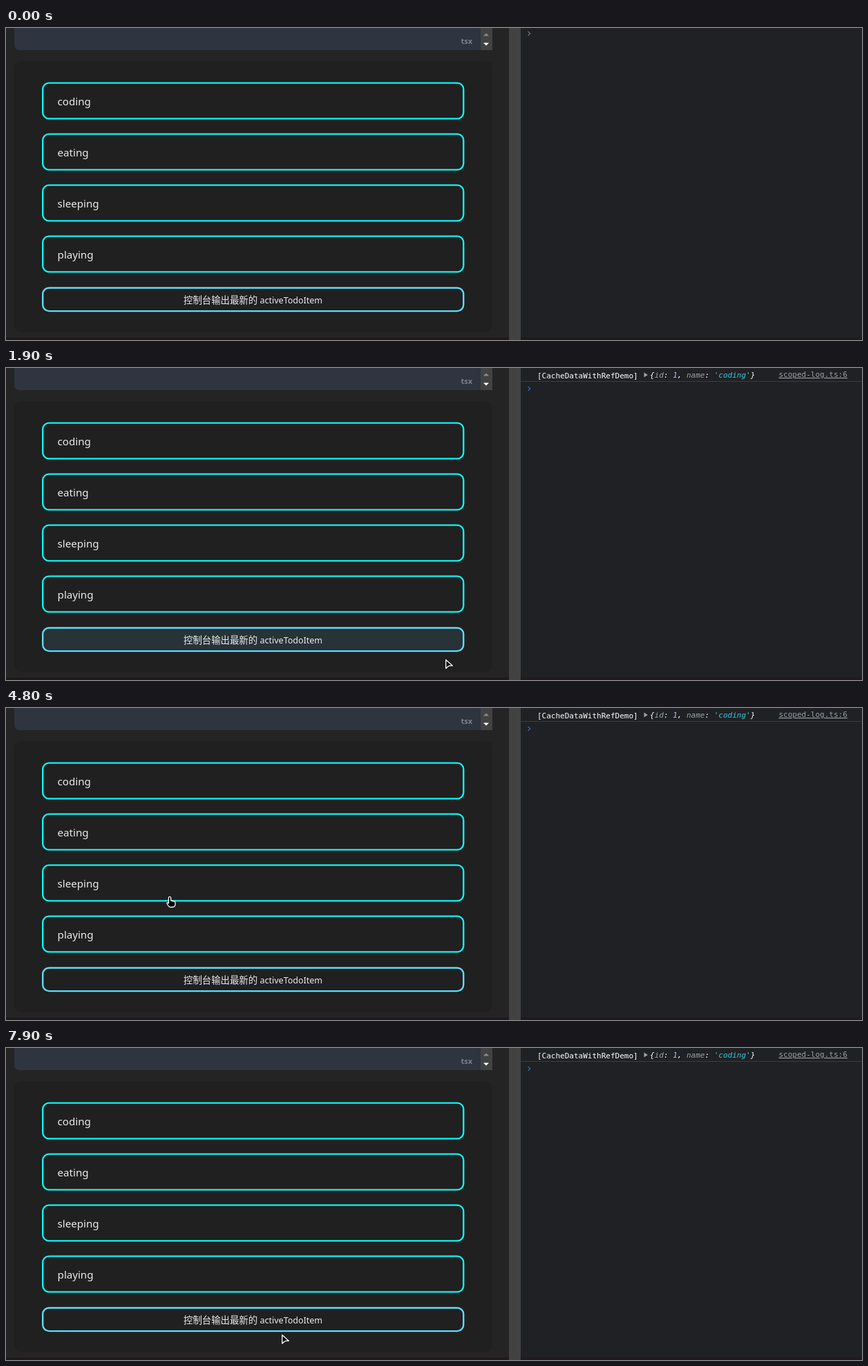
These frames come from a looping animation (1239 px wide and 452 px high, 8 s). An HTML page:

```html
<!DOCTYPE html>
<html lang="zh">
<head>
<meta charset="utf-8">
<title>Todo demo with console</title>
<style>
  html, body { margin: 0; width: 100%; height: 100%; overflow: hidden; background: #242424; }
  svg { display: block; }
  text { white-space: pre; }
  .ui { font: 15.1px "Noto Sans", sans-serif; fill: #ececec; }
  .cjk { font: 13.4px "Noto Sans CJK SC", "Noto Sans CJK", sans-serif; }
  .label { font-size: 12.5px; }
  .lang { font: bold 11px "Noto Sans", sans-serif; fill: #7c828c; }
  .console { font: 11px "DejaVu Sans Mono", monospace; fill: #fff; }
  .key { fill: #9aa0a6; }
  .number { fill: #b9b6f2; }
  .string { fill: #3cc9dc; }
  .link { fill: #9aa0a6; text-decoration: underline; }
  .box { fill: none; stroke-width: 2.4; }
  #cursors path { fill: #000; stroke: #fff; stroke-width: 1.3; stroke-linejoin: round; }
</style>
</head>
<body>
<svg width="1239" height="452" viewBox="0 0 1239 452">
  <rect width="728" height="452" fill="#242424"/>
  <rect x="12" y="-12" width="692" height="44" rx="7" fill="#2e3440"/>
  <rect x="687" width="17" height="32" fill="#424242"/>
  <path d="M691 11.5l4-4 4 4z" fill="#8b8b8b"/>
  <path d="M691 21.5l4 4 4-4z" fill="#fff"/>
  <text class="lang" x="658.5" y="23">tsx</text>

  <rect x="12" y="48" width="692" height="393" rx="11" fill="#202020"/>
  <g id="items"></g>
  <rect id="button" class="box" x="53.2" y="376.5" width="609" height="33.6" rx="9" stroke="#61dafb"/>
  <text class="ui cjk" x="257" y="398.5">控制台输出最新的</text>
  <text class="ui label" x="367.5" y="398.5">activeTodoItem</text>

  <rect x="745" width="494" height="452" fill="#202124"/>
  <rect y="448.5" width="1239" height="3.5" fill="#1f191c"/>
  <rect x="728" width="17" height="452" fill="#424242"/>
  <g id="log" class="console">
    <text x="769" y="15">[CacheDataWithRefDemo]</text>
    <path d="M923.5 6.5v7l5.5-3.5z" fill="#9aa0a6"/>
    <text x="932" y="14" font-style="italic">{<tspan class="key">id</tspan>: <tspan class="number">1</tspan>, <tspan class="key">name</tspan>: <tspan class="string">'coding'</tspan>}</text>
    <text class="link" x="1118.5" y="13">scoped-log.ts:6</text>
    <rect x="745" y="19" width="494" height="1" fill="#3a3c40"/>
  </g>
  <path id="prompt" d="M755.5 -3l3.2 3-3.2 3" fill="none" stroke-width="1.3"/>

  <g id="cursors">
    <path id="arrow" d="M.7 .7V13.2L4.3 9.9Q5 9.3 6 9.3H10.2Z"/>
    <path id="hand" d="M-1.6 10V2a1.6 1.6 0 0 1 3.2 0V6L6.5 7Q8 7.5 8 9.5V11Q8 15.5 4 15.5H1Q-1 15.5-2 13.5L-4 10.5Q-4.4 8.2-1.6 10Z"/>
    <path id="beam" d="M-3-8H3M0-8V8M-3 8H3"/>
  </g>
</svg>
<script>
const LOOP = 8000, STEP = 100;
const ENTER = 600, HOVER_START = 800, LOG_TIME = 1300, HOVER_END = 1700;
const byId = id => document.getElementById(id);
const clamp = k => Math.min(1, Math.max(0, k));
const easeOut = k => 1 - (1 - k) ** 2;

// Each gesture glides the pointer to a spot between two times, then it rests.
const gestures = [
  { from: ENTER, to: 1200, x: 462, y: 394 },
  { from: 1500, to: 1700, x: 571, y: 419 },
  { from: 1700, to: 1900, x: 636, y: 422 },
  { from: 1900, to: 2400, x: 1066, y: 17 },
  { from: 2400, to: 3200, x: 240, y: 175 },
  { from: 3300, to: 3500, x: 213, y: 177 },
  { from: 3900, to: 4200, x: 244, y: 260 },
  { from: 4300, to: 4600, x: 234, y: 254 },
  { from: 4700, to: 5400, x: 246, y: 324 },
  { from: 5900, to: 6000, x: 262, y: 326 },
  { from: 6000, to: 6800, x: 191, y: 195 },
  { from: 6800, to: 7100, x: 195, y: 246 },
  { from: 7500, to: 7900, x: 399, y: 415 }
];

const itemTop = i => 79.6 + 74 * i;
const names = ["coding", "eating", "sleeping", "playing"];
byId("items").innerHTML = names.map((name, i) => `
  <rect class="box" x="53.2" y="${itemTop(i)}" width="609" height="51.8" rx="9" stroke="#0ff5f5"/>
  <text class="ui" x="74.6" y="${112 + 74 * i}">${name}</text>`).join("");

function pointerAt(t) {
  let x = 560, y = 446;
  for (const move of gestures) {
    const k = easeOut(clamp((t - move.from) / (move.to - move.from)));
    x += (move.x - x) * k;
    y += (move.y - y) * k;
  }
  return { x, y };
}

function cursorKind({ x, y }) {
  if (x > 769 && y < 19) return "beam";
  const boxes = [...document.querySelectorAll(".box")];
  const inside = boxes.some(({ x: left, y: top, width, height }) =>
    x > left.baseVal.value && x < left.baseVal.value + width.baseVal.value &&
    y > top.baseVal.value && y < top.baseVal.value + height.baseVal.value);
  return inside ? "hand" : "arrow";
}

function render(now) {
  const t = Math.floor(now % LOOP / STEP) * STEP;
  const pointer = pointerAt(t);
  const kind = cursorKind(pointer);
  const fade = since => clamp((t - since) / 300);
  const tint = .3 * (fade(HOVER_START) - fade(HOVER_END));
  const logged = t >= LOG_TIME;

  byId("cursors").setAttribute("transform", `translate(${Math.round(pointer.x)} ${Math.round(pointer.y)})`);
  for (const id of ["arrow", "hand", "beam"])
    byId(id).style.display = t >= ENTER && id === kind ? "" : "none";

  byId("button").style.fill = `rgba(97, 218, 251, ${tint})`;
  byId("log").style.display = logged ? "" : "none";
  byId("prompt").setAttribute("transform", `translate(0 ${logged ? 30 : 8})`);
  byId("prompt").setAttribute("stroke", logged ? "#3468b8" : "#6e7074");
}

const start = performance.now();
(function tick() {
  render(performance.now() - start);
  requestAnimationFrame(tick);
})();
</script>
</body>
</html>
```
